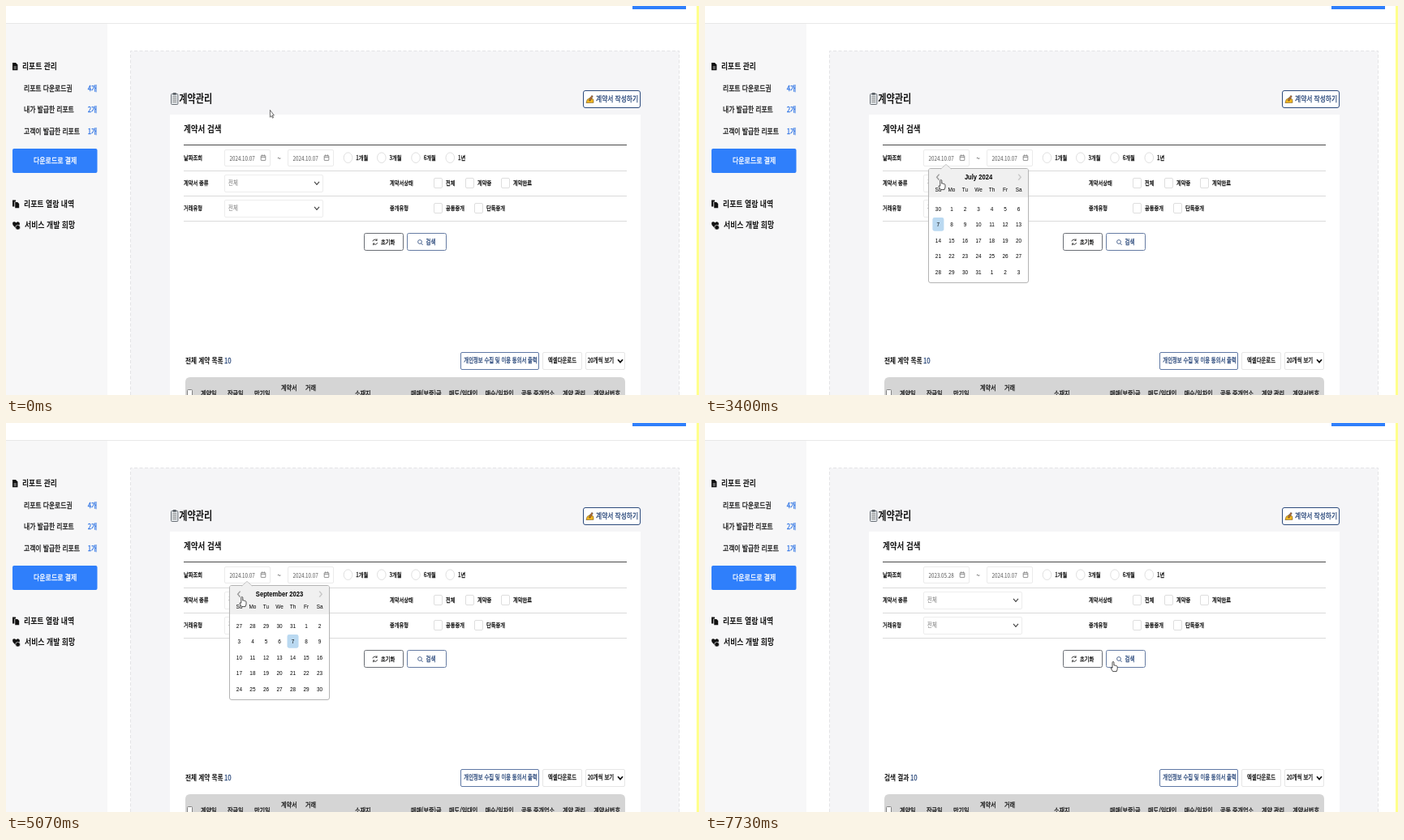
These frames come from a looping animation (854 px wide and 480 px high, 8000 ms). An HTML page:

```html
<!DOCTYPE html>
<html lang="ko">
<head>
<meta charset="utf-8">
<title>계약관리</title>
<style>
  html, body { margin: 0; width: 100%; height: 100%; overflow: hidden; background: #fff; }
  svg { display: block; width: 854px; height: 480px; }
  text { font-family: "Noto Sans CJK KR", "Noto Sans CJK", "Noto Sans", sans-serif; color: #161616; fill: currentColor; white-space: pre; }
  .m { stroke: currentColor; stroke-width: .28px; }
  .b { font-weight: 700; }
  .blue { color: #2f74e4; }
  .navy { color: #2c4a7c; }
  .gray { color: #777; }
  .date { color: #555; }
  .white { color: #fff; }
  .cal text { font-family: "Liberation Sans", Arial, sans-serif; color: #000; text-anchor: middle; }
</style>
</head>
<body>
<svg id="stage" viewBox="0 0 854 480"></svg>
<script>
const SQUEEZE = 0.845;   // the whole page is slightly narrowed
const TICK = 1000 / 15, LOOP = 8000;

// text placed by left edge (or anchor) and vertical middle
const text = (x, y, str, size, cls = '', id = '') =>
  `<text ${id && `id="${id}"`} class="${cls}" font-size="${size}" transform="translate(${x} ${y + size * 0.36}) scale(${SQUEEZE} 1)">${str}</text>`;
const rect = (x, y, w, h, fill, stroke = 'none', r = 0, sw = 1) =>
  `<rect x="${x}" y="${y}" width="${w}" height="${h}" rx="${r}" fill="${fill}" stroke="${stroke}" stroke-width="${sw}"/>`;
const path = (d, stroke, sw = 1, fill = 'none', extra = '') =>
  `<path d="${d}" stroke="${stroke}" stroke-width="${sw}" fill="${fill}" ${extra}/>`;
const hline = (x1, x2, y, color) => path(`M${x1} ${y}H${x2}`, color);
const down = (x, y, color, sw) => path(`M${x - 3} ${y - 1.6}l3 3.4 3-3.4`, color, sw);

function sidebar() {
  const links = [['리포트 다운로드권', '4개'], ['내가 발급한 리포트', '2개'], ['고객이 발급한 리포트', '1개']];
  return rect(0, 22, 125, 458, '#f7f7f8') +
    path('M8 70h4l2.4 2.6v6.6H8z', 'none', 0, '#111') + path('M9.5 75h3.4M9.5 77h3.4', '#f7f7f8', .7) +
    text(20, 74, '리포트 관리', 10.4, 'b') +
    links.map(([name, n], i) =>
      text(22, 101.5 + i * 26.4, name, 9.25, 'm') + text(100.7, 101.5 + i * 26.4, n, 9.25, 'blue m')).join('') +
    rect(8, 176, 104.5, 30, '#2f7ffb', 'none', 2) + text(34, 190.7, '다운로드로 결제', 9.4, 'white m') +
    path('M8 239.5h4v2h-1.6v6H8z', 'none', 0, '#111') + path('M11.2 242h3l2 2v5.2h-5z', 'none', 0, '#111') +
    text(22, 244, '리포트 열람 내역', 10.5, 'b') +
    path('M12.4 274.5L8.6 270.5Q7 266 10.4 266.2Q12 266.4 12.6 267.6Q14 265.6 16 266.8Q18 268.6 15.8 271.2Z', 'none', 0, '#111') +
    '<circle cx="14.6" cy="273.2" r="2.9" fill="#111" stroke="#f7f7f8" stroke-width=".7"/>' +
    text(23, 270.6, '서비스 개발 희망', 10.5, 'b');
}

function titleRow() {
  return rect(203.5, 108.5, 8.4, 13, '#dfe3e6', '#6d737a', 1, 1) +
    path('M205.4 111.8h4.6M205.4 114h4.6M205.4 116.2h4.6M205.4 118.4h4.6', '#777', .8) +
    rect(205.6, 107, 4.2, 2.8, '#5b6167', 'none', .8) +
    text(213.2, 114, '계약관리', 13.2, 'b') +
    rect(711.5, 104.5, 70, 21, '#fff', '#2c4a7c', 2.5, 1) +
    path('M715 119.5l1.2-4 4-2.6 3.6 2.4.2 4z', '#6b4a10', .6, '#f5b921') +
    path('M718.4 116.5l3.4-6 1.4.8-3.2 5.8z', '#333', .6, '#e07b2c') +
    text(727, 114.6, '계약서 작성하기', 9.2, 'navy m');
}

const dateBox = (x, id) =>
  rect(x + .5, 177.5, 56, 20, '#fff', '#ebebeb', 1.5) +
  text(x + 6.5, 188, '2024.10.07', 7.4, 'date', id) +
  rect(x + 45.2, 184.6, 5.6, 6, 'none', '#777', .6, .8) +
  path(`M${x + 45.2} 186.6h5.6M${x + 46.7} 183.4v2M${x + 49.3} 183.4v2`, '#777', .8);

const select = y => rect(269.5, y, 121, 21, '#fff', '#ededed', 1.5) +
  text(274, y + 10.2, '전체', 7.6, 'gray') + down(383, y + 10, '#444', 1.2);

const check = (x, y, label) => rect(x + .5, y - 6, 10, 12, '#fff', '#dedede', 1.5) +
  text(x + 15, y - .3, label, 7.4, 'm');

const radio = (x, label) =>
  `<ellipse cx="${x}" cy="187.2" rx="5.3" ry="6.3" fill="#fff" stroke="#dcdcdc" stroke-width=".9"/>` +
  text(x + 9.7, 187, label, 7.4, 'm');

function searchForm() {
  return rect(202, 134, 580, 346, '#fff') + text(219, 152, '계약서 검색', 11.3, 'b') +
    hline(219, 765, 171.5, '#4a4a4a') + [203.5, 234.5, 265.5].map(y => hline(219, 765, y, '#dadada')).join('') +
    text(219, 187, '날짜조회', 7.4, 'm') + text(219, 218, '계약서 종류', 7.4, 'm') + text(219, 249.6, '거래유형', 7.4, 'm') +
    dateBox(269, 'from') + text(334.4, 187.5, '~', 9) + dateBox(347, 'to') +
    radio(421.5, '1개월') + radio(462.8, '3개월') + radio(505, '6개월') + radio(547.3, '1년') +
    select(208.5) + select(239.5) +
    text(473, 218, '계약서상태', 7.4, 'm') + text(473, 249.6, '중개유형', 7.4, 'm') +
    check(527, 218.5, '전체') + check(566, 218.5, '계약중') + check(610, 218.5, '계약완료') +
    check(527, 249.5, '공동중개') + check(577, 249.5, '단독중개') +
    rect(441.5, 280.5, 48, 21, '#fff', '#6a6e75', 2) +
    path('M452 290.4a2.8 2.8 0 0 1 5-1.2v-2M457.6 292a2.8 2.8 0 0 1-5 1.2v2M457.4 289.4h-2M452.4 293h2', '#333', .9) +
    text(462, 291, '초기화', 7.4, 'm') +
    rect(494.5, 280.5, 48, 21, '#fff', '#667ca3', 2) +
    '<circle cx="510" cy="291" r="2.4" fill="none" stroke="#2c4a7c" stroke-width=".8"/>' +
    path('M511.7 292.8l2 2.2', '#2c4a7c', .8) + text(517.6, 291, '검색', 7.5, 'navy m');
}

function list() {
  const heads = [[240, '계약일'], [273, '잔금일'], [306, '만기일'], [430, '소재지'], [499, '매매(보증)금'], [546, '매도/임대인'],
    [590.5, '매수/임차인'], [635, '공동 중개업소'], [686, '계약 관리'], [724.3, '계약서번호']];
  return text(221, 437.7, '전체 계약 목록', 9.1, 'b', 'listTitle') + text(269, 437.9, '10', 9.2, 'navy m', 'listCount') +
    rect(560.5, 427.5, 96, 21, '#fff', '#5f78a5', 1.5) + text(564.3, 437.6, '개인정보 수집 및 이용 동의서 출력', 7.5, 'navy m') +
    rect(661.5, 427.5, 48, 21, '#fff', '#e6e6e6', 1.5) + text(668, 437.6, '엑셀다운로드', 7.5, 'm') +
    rect(714.5, 427.5, 48, 21, '#fff', '#e6e6e6', 1.5) + text(716.7, 437.6, '20개씩 보기', 7.6, 'm') + down(757, 437.8, '#111', 1.7) +
    path('M221 480V464Q221 458 227 458H757Q763 458 763 464V480Z', 'none', 0, '#d5d5d5') +
    rect(223.5, 473.5, 6, 9, '#fff', '#777', 1, .9) +
    text(339, 470.8, '계약서', 8.4, 'm') + text(369, 470.8, '거래', 8.4, 'm') +
    heads.map(([x, s]) => text(x, 478, s, 8.4, 'm')).join('');
}

const colX = i => 287.4 + i % 7 * 16.53;
const rowY = i => 250.3 + Math.floor(i / 7) * 19.4;

function picker() {
  const cells = Array.from({ length: 42 }, (_, i) => text(colX(i), rowY(i), '', 7.6, '', 'c' + i)).join('');
  return `<g id="cal" class="cal">
    <rect id="calBox" x="275.5" y="200.5" width="123" height="141" rx="2.5" fill="#fff" stroke="#b4b4b4"/>` +
    path('M276 236V203Q276 201 278 201H396Q398 201 398 203V236Z', 'none', 0, '#f0f0f0') +
    path('M290.5 201.2L297 195.4L303.5 201.2', '#c0c0c0', .9, '#f0f0f0') +
    path('M288.6 207.6l-3 3.6 3 3.6', '#c4c4c4', 1.4, 'none', 'id="prev"') +
    path('M386.2 207.6l3 3.6-3 3.6', '#c8c8c8', 1.4) +
    text(337, 211.2, '', 9, 'b', 'month') +
    ['Su', 'Mo', 'Tu', 'We', 'Th', 'Fr', 'Sa'].map((d, i) => text(colX(i), 226.4, d, 7.6)).join('') +
    '<rect id="mark" width="14" height="16.6" rx="2.4"/>' + cells + '</g>';
}

const cursors =
  '<g id="arrow">' + path('M.4.4V9.2L2.2 7.5L3.4 10.2L4.5 9.7L3.3 6.9H5.4Z', '#333', .7, '#fff') + '</g>' +
  '<g id="beam">' + path('M-2-5.5H-.4Q0-5.4 0-5Q0-5.4.4-5.5H2M0-5V5M-2 5.5H-.4Q0 5.4 0 5Q0 5.4.4 5.5H2', '#333', .8) + '</g>' +
  '<g id="hand">' + path('M-1 1Q0-.6 1 1V5Q2 4 2.8 5.2Q3.8 4.6 4.4 5.8Q5.2 5.6 5.2 7V9.5L4.2 12.4H-.4L-2.8 8.6Q-3 7 -1 8Z', '#222', .8, '#fff') + '</g>';

const stage = document.getElementById('stage');
stage.innerHTML = rect(0, 0, 854, 480, '#fff') + hline(0, 851, 21.5, '#e8e8e8') +
  rect(772, 0, 66, 4, '#2f7ffb') + rect(851, 0, 3, 480, '#ffff8c') + sidebar() +
  rect(153.5, 55.5, 676, 440, '#f5f5f7') +
  path('M153.5 480V55.5H829.5V480', '#e3e3e6', 1, 'none', 'stroke-dasharray="4 2.5"') +
  titleRow() + searchForm() + list() +
  '<g id="focus">' + rect(275.5, 183.5, 44, 10, 'none', '#1a1a1a', 1.5, 1.1) + '</g>' +
  '<g id="caret">' + path('M291 184.5v8', '#222', .9) + '</g>' + picker() + cursors;

const el = id => document.getElementById(id);
const show = (id, on) => el(id).setAttribute('visibility', on ? 'visible' : 'hidden');
const set = (id, attrs) => { for (const k in attrs) el(id).setAttribute(k, attrs[k]); };

const MONTHS = 'January February March April May June July August September October November December'.split(' ');
const BACK = [46, 49, 51, 54, 56, 59, 61, 63, 66, 68, 71, 73, 76, 78, 82, 85];

// tick, x, y, cursor shape
const PATH = [
  [0, 325, 128, 'arrow'], [2, 350, 117, 'arrow'], [4, 384, 112.5, 'arrow'], [5, 395.5, 122, 'arrow'],
  [7, 366, 160, 'arrow'], [9, 305, 184, 'beam'], [10, 290, 186, 'beam'], [14, 290, 186, 'beam'],
  [15, 291, 187, 'beam'], [23, 291, 187, 'beam'], [25, 313.5, 189, 'arrow'], [30, 313.5, 189, 'arrow'],
  [33, 323.5, 199, 'arrow'], [36, 303.6, 211.6, 'arrow'], [39, 293, 216, 'hand'], [42, 290.8, 214.2, 'hand'],
  [89, 290.8, 214.2, 'hand'], [92, 296, 224, 'arrow'], [95, 291, 241, 'hand'], [97, 288, 247, 'hand'],
  [99, 288, 247, 'hand'], [100, 294, 249, 'arrow'], [103, 350, 268, 'arrow'], [106, 440, 288, 'hand'],
  [109, 499, 295, 'hand'], [110, 503, 294.2, 'hand'], [120, 503, 294.2, 'hand']
];

function cursorAt(k) {
  const i = PATH.findIndex(p => p[0] > k), a = PATH[i - 1], b = PATH[i];
  const u = (k - a[0]) / (b[0] - a[0]);
  return [a[1] + (b[1] - a[1]) * u, a[2] + (b[2] - a[2]) * u, a[3]];
}

function drawMonth(back, hover) {
  const first = new Date(Date.UTC(2024, 9 - back, 1));
  const year = first.getUTCFullYear(), month = first.getUTCMonth(), lead = first.getUTCDay();
  const days = new Date(Date.UTC(year, month + 1, 0)).getUTCDate();
  const rows = Math.ceil((lead + days) / 7), seventh = lead + 6;
  el('month').textContent = MONTHS[month] + ' ' + year;
  el('calBox').setAttribute('height', 141 + (rows - 5) * 19);
  for (let i = 0; i < 42; i++) {
    el('c' + i).textContent = i < rows * 7 ? new Date(Date.UTC(year, month, 1 + i - lead)).getUTCDate() : '';
    el('c' + i).style.color = !back && i === seventh ? '#fff' : '#000';
  }
  set('mark', { x: colX(seventh) - 7, y: rowY(seventh) - 8.6, fill: back ? '#bad9f1' : '#216ba5' });
  el('prev').setAttribute('stroke', hover ? '#9c9c9c' : '#c4c4c4');
}

function draw(k) {
  const [x, y, shape] = cursorAt(k);
  for (const c of ['arrow', 'beam', 'hand']) show(c, c === shape);
  el(shape).setAttribute('transform', `translate(${x} ${y})`);

  const picked = k >= 100, found = k >= 116;
  show('focus', k >= 18 && k < 44 || picked && k < 114);
  show('caret', k >= 18 && k < 44);
  show('cal', k >= 19 && !picked);
  drawMonth(BACK.filter(b => b <= k).length, shape === 'hand' && y < 222);
  el('from').textContent = picked ? '2023.05.28' : '2024.10.07';
  el('listTitle').textContent = found ? '검색 결과' : '전체 계약 목록';
  el('listCount').setAttribute('transform', `translate(${found ? 253 : 269} 441.2) scale(${SQUEEZE} 1)`);
}

let last = -1;
function frame() {
  const k = Math.floor((performance.now() % LOOP + 3.4) / TICK) % 120;
  if (k !== last) draw(last = k);
  requestAnimationFrame(frame);
}
frame();
</script>
</body>
</html>
```
